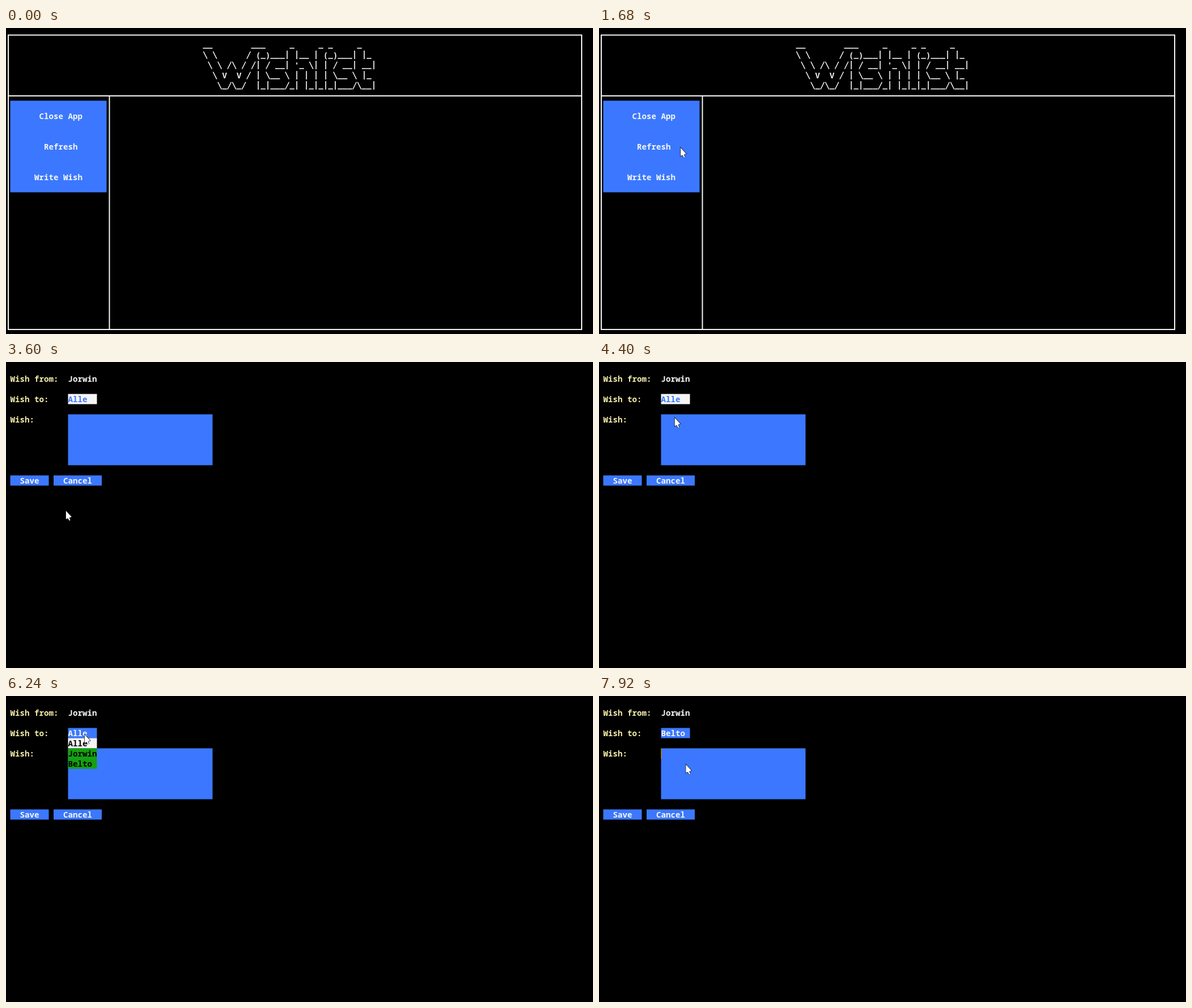
Write an HTML page with a canvas that moves like this. It is 1036x541 px and loops after 8000 ms.

```html
<!DOCTYPE html>
<html lang="en">
<head>
<meta charset="utf-8">
<title>Wishlist</title>
<style>
html, body { margin: 0; width: 100%; height: 100%; overflow: hidden; background: #000; }
canvas { display: block; }
</style>
</head>
<body>
<canvas id="stage" width="1036" height="541"></canvas>
<script>
const ctx = document.getElementById('stage').getContext('2d');
const LOOP = 8000, STEP = 80;
const CELL = 8.5, ROW = 18, LEFT = 7.5, TOP = 2.5, BASE = 17;
const BLUE = '#3b78ff', WHITE = '#f5f5f5', YELLOW = '#f3ecaa', GREEN = '#13a10e', BLACK = '#000';
const USER = 'Jorwin', FRIEND = 'Belto';
const ENTER = 1200, FORM = 3600, OPEN = 6240, PICK = 7040, TYPE = 7920;

const LOGO = [
  '__        ___     _     _ _     _',
  '\\ \\      / (_)___| |__ | (_)___| |_',
  " \\ \\ /\\ / /| / __| '_ \\| | / __| __|",
  '  \\ V  V / | \\__ \\ | | | | \\__ \\ |_',
  '   \\_/\\_/  |_|___/_| |_|_|_|___/\\__|'
];

// Each move eases the pointer to a new spot
const MOVES = [
  { from: ENTER, to: 2080, x: 121, y: 207 },
  { from: 2240, to: 2880, x: 105.5, y: 262.5 },
  { from: 3680, to: 4640, x: 138.5, y: 67.5 },
  { from: OPEN, to: 6800, x: 133, y: 121 },
  { from: PICK - STEP, to: 7280, x: 153, y: 120.5 }
];

const colX = col => LEFT + col * CELL;
const baseline = row => BASE + row * ROW;

function line(x0, y0, x1, y1, width, color = WHITE) {
  ctx.strokeStyle = color;
  ctx.lineWidth = width;
  ctx.beginPath();
  ctx.moveTo(x0, y0);
  ctx.lineTo(x1, y1);
  ctx.stroke();
}

function block(color, col, row, cols, rows = 1) {
  ctx.fillStyle = color;
  ctx.fillRect(colX(col), TOP + row * ROW, cols * CELL, rows * ROW);
}

function text(str, col, row, color = WHITE) {
  ctx.fillStyle = color;
  [...str].forEach((ch, i) => ctx.fillText(ch, colX(col + i), baseline(row)));
}

// Bars, slashes and underscores fill their cell, other signs are plain text
function logoChar(ch, col, row) {
  const x = colX(col), y = baseline(row), mid = x + CELL / 2;
  if (ch === '_') line(x, y + 0.7, x + CELL, y + 0.7, 1.6);
  else if (ch === '|') line(mid, y - 13, mid, y + 2, 1.7);
  else if (ch === '/') line(x + 7.5, y - 11.5, x + 1, y + 1.5, 1.6);
  else if (ch === '\\') line(x + 1, y - 11.5, x + 7.5, y + 1.5, 1.6);
  else text(ch, col, row);
}

function drawMenu() {
  ctx.strokeStyle = WHITE;
  ctx.lineWidth = 2;
  ctx.strokeRect(4, 12.5, 1012, 520.5);
  line(4, 120, 1016, 120, 2);
  line(182.5, 120, 182.5, 533, 2);
  LOGO.forEach((str, r) => [...str].forEach((ch, i) => logoChar(ch, 40 + i, 1 + r)));
  block(BLUE, 0, 7, 20, 9);
  text('Close App', 6, 8);
  text('Refresh', 7, 11);
  text('Write Wish', 5, 14);
}

function drawForm(t) {
  const open = t >= OPEN && t < PICK;
  const typing = t >= TYPE;
  const focused = !open && !typing;
  text('Wish from:', 0, 1, YELLOW);
  text(USER, 12, 1);
  text('Wish to:', 0, 3, YELLOW);
  block(focused ? WHITE : BLUE, 12, 3, 6);
  text(t < PICK ? 'Alle' : FRIEND, 12, 3, focused ? BLUE : WHITE);
  text('Wish:', 0, 5, YELLOW);
  block(BLUE, 12, 5, 30, 5);
  block(BLUE, 0, 11, 8);
  text('Save', 2, 11);
  block(BLUE, 9, 11, 10);
  text('Cancel', 11, 11);
  if (open) {
    ['Alle', USER, FRIEND].forEach((name, i) => {
      block(i ? GREEN : WHITE, 12, 4 + i, 6);
      text(name, 12, 4 + i, BLACK);
    });
  }
  if (typing) line(110.2, 93, 110.2, 111, 1.4, '#c48700');
}

function arrow(color, width) {
  line(4, 11, 7, 17.5, width + 2, color);
  ctx.lineWidth = width;
  ctx.fillStyle = color;
  ctx.beginPath();
  ctx.moveTo(0.5, 1);
  ctx.lineTo(0.5, 15);
  ctx.lineTo(10, 11.2);
  ctx.closePath();
  ctx.fill();
  ctx.stroke();
}

function drawPointer(t) {
  if (t < ENTER) return;
  let x = 173.5, y = 216.5;
  for (const m of MOVES) {
    const u = Math.min(1, Math.max(0, (t - m.from) / (m.to - m.from)));
    const k = u * u * (3 - 2 * u);
    x += (m.x - x) * k;
    y += (m.y - y) * k;
  }
  ctx.save();
  ctx.translate(x, y);
  arrow(BLACK, 1.6);
  arrow('#fff', 0.3);
  ctx.restore();
}

function draw(time) {
  const t = Math.floor((time % LOOP) / STEP) * STEP;
  ctx.fillStyle = BLACK;
  ctx.fillRect(0, 0, 1036, 541);
  ctx.font = '600 14.1667px "Noto Sans Mono", "DejaVu Sans Mono", monospace';
  if (t < FORM) drawMenu();
  else drawForm(t);
  drawPointer(t);
}

const start = performance.now();
function tick() {
  draw(performance.now() - start);
  requestAnimationFrame(tick);
}
tick();
</script>
</body>
</html>
```
